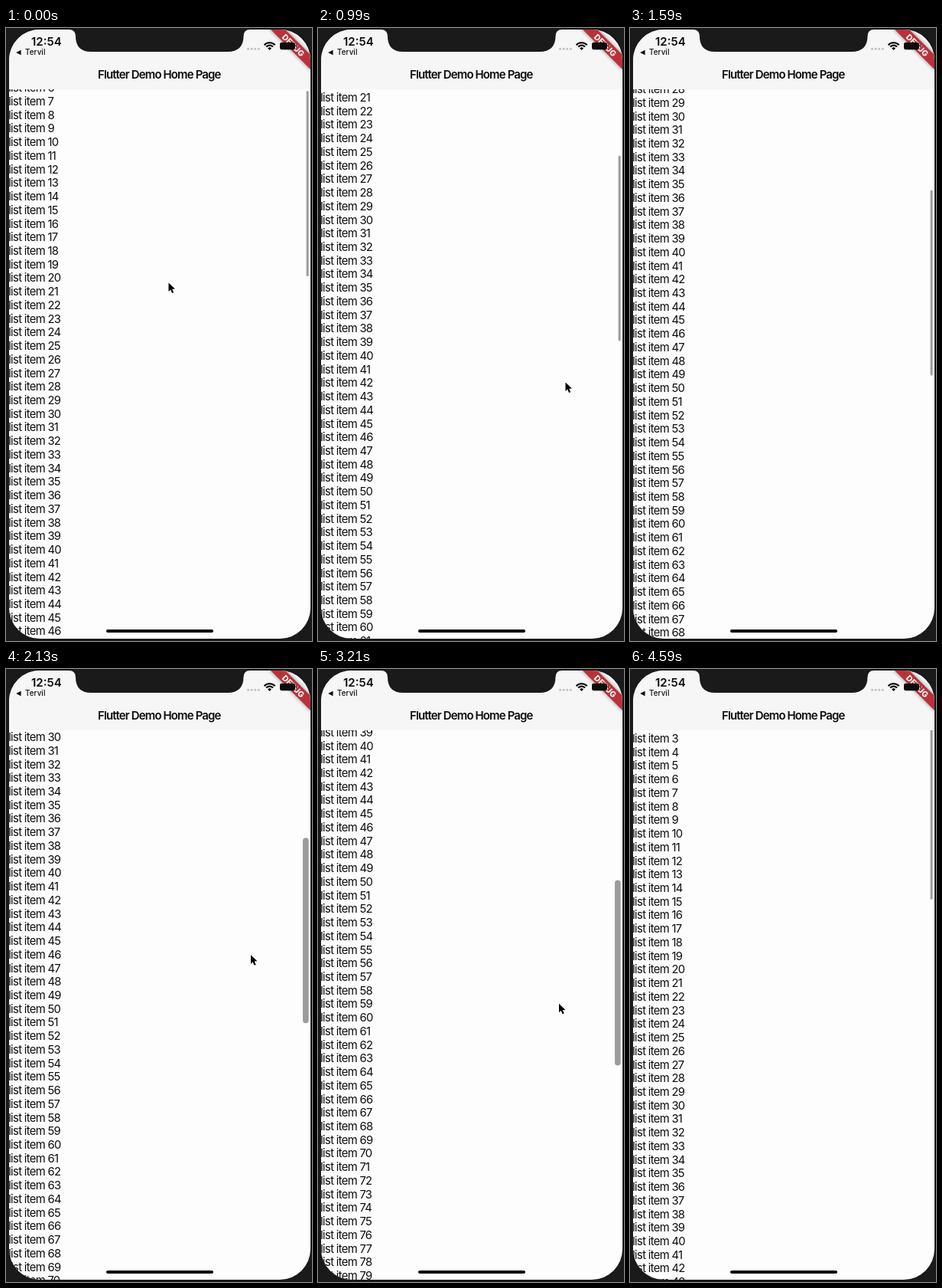
Write an HTML page with a canvas that moves like this. It is 400 by 800 pixels and loops after 5040 ms.

```html
<!DOCTYPE html>
<html lang="en">
<head>
<meta charset="utf-8">
<style>
html, body { margin: 0; width: 100%; height: 100%; overflow: hidden; background: #1a1a1a; }
canvas { display: block; width: 400px; height: 800px; }
</style>
</head>
<body>
<canvas id="stage" width="400" height="800"></canvas>
<script>
const ctx = document.getElementById('stage').getContext('2d');
const LOOP = 5040, STEP = 30, LAST = 4590;
const ROW = 17.73, FONT = 'Inter, "Open Sans", sans-serif';
const BEZEL = '#1a1a1a', PAPER = '#fdfdfe', BAR = '#f6f6f6', INK = '#0c0c0c';

const linear = u => u;
const smooth = u => u * u * (3 - 2 * u);
const easeIn = u => u * u;
const easeOut = u => 1 - (1 - u) * (1 - u);
const clamp = (v, lo, hi) => Math.min(hi, Math.max(lo, v));

// Keys are [time, ...values, easing into this key].
function track(keys, t) {
  const i = keys.findIndex(k => k[0] > t);
  if (i === 0) return keys[0].slice(1, -1);
  if (i < 0) return keys[keys.length - 1].slice(1, -1);
  const a = keys[i - 1], b = keys[i];
  const u = b[b.length - 1]((t - a[0]) / (b[0] - a[0]));
  return a.slice(1, -1).map((v, n) => v + (b[n + 1] - v) * u);
}

// Scroll position, as the item number on the first full row.
const FLING = 690, GRAB = 1900;
const fling = t => 31.9 - 10.9 * Math.exp((990 - t) / 500);
const scrollKeys = [
  [0, 6.72, linear],
  [300, 6.72, linear],
  [FLING, fling(FLING), easeIn]
];
const dragKeys = [
  [GRAB, fling(GRAB), linear],
  [2190, 30.1, linear],
  [2715, 15.7, smooth],
  [2760, 16.05, easeIn],
  [3210, 39.46, smooth],
  [3390, 42, easeOut],
  [3900, 20, smooth],
  [4140, 20, linear],
  [LAST, 3, smooth]
];
function scrollAt(t) {
  if (t < FLING) return track(scrollKeys, t)[0];
  return t < GRAB ? fling(t) : track(dragKeys, t)[0];
}

const thumbTop = p => Math.max(79, 82 + (p - 6.72) * 5.91);

const pointerKeys = [
  [0, 212.5, 332.5, linear],
  [300, 212.5, 332.5, linear],
  [FLING, 216, 240, smooth],
  [990, 323.5, 462.5, smooth],
  [1350, 410, 470, smooth],
  [1590, 410, 400, smooth],
  [GRAB, 320, 373, smooth]
];
const dragX = [
  [GRAB, 320, linear],
  [2190, 320, linear],
  [2760, 313.5, smooth],
  [3210, 315, smooth],
  [3960, 318, smooth]
];
const leaveKeys = [
  [3960, 318, 312, linear],
  [4260, 412, 360, smooth]
];
function pointerAt(t, p) {
  if (t < GRAB) return track(pointerKeys, t);
  if (t >= 3960) return track(leaveKeys, t);
  return [track(dragX, t)[0], 373 + (thumbTop(p) - 220) * 1.15];
}

function text(str, x, y, size, weight, spacing, color = INK, align = 'left') {
  ctx.font = `${weight} ${size}px ${FONT}`;
  ctx.letterSpacing = spacing + 'px';
  ctx.textAlign = align;
  ctx.fillStyle = color;
  ctx.fillText(str, x, y);
}

function pill(x, y, w, h, r, color) {
  ctx.fillStyle = color;
  ctx.beginPath();
  ctx.roundRect(x, y, w, h, r);
  ctx.fill();
}

function polygon(points, color) {
  ctx.fillStyle = color;
  ctx.beginPath();
  points.forEach(([x, y]) => ctx.lineTo(x, y));
  ctx.closePath();
  ctx.fill();
}

function drawList(p) {
  ctx.save();
  ctx.beginPath();
  ctx.rect(4, 80, 394, 718);
  ctx.clip();
  const first = Math.max(0, Math.floor(p) - 2);
  for (let n = first; n < first + 46; n++)
    text('list item ' + n, 3.2, 96 + (n - p) * ROW, 14.8, 400, -0.68);
  ctx.restore();
}

function drawThumb(t, p) {
  const grow = clamp((t - 1960) / 100, 0, 1) * clamp((4060 - t) / 100, 0, 1);
  const w = 3 + 4.6 * grow;
  const h = 242 - Math.max(0, 6.25 - p) * 6.2;
  pill(395.6 - w, thumbTop(p), w, h, w / 2, '#9c9c9e');
}

function drawBanner() {
  ctx.save();
  ctx.shadowColor = 'rgba(0, 0, 0, 0.45)';
  ctx.shadowBlur = 5;
  polygon([[344, 0], [363, 0], [400, 37], [400, 56]], '#b8323a');
  ctx.restore();
  ctx.save();
  ctx.translate(375.5, 22.5);
  ctx.rotate(Math.PI / 4);
  text('DEBUG', 0, 3.8, 10.5, 800, -0.1, '#fbf3f3', 'center');
  ctx.restore();
}

function drawStatus() {
  text('12:54', 33, 22.6, 15, 600, 0);
  polygon([[13.2, 32], [19.6, 28.7], [19.6, 35.3]], INK);
  text('Tervil', 25, 35.4, 9.8, 500, 0.1);
  for (let i = 0; i < 4; i++) pill(315 + i * 4.6, 25.8, 3, 3, 1.5, '#c2c2c4');

  ctx.strokeStyle = INK;
  ctx.lineWidth = 2.2;
  for (const r of [9.4, 5.9]) {
    ctx.beginPath();
    ctx.arc(344.6, 28.5, r, -Math.PI * 0.77, -Math.PI * 0.23);
    ctx.stroke();
  }
  polygon([[344.6, 29], [342, 26.2], [344.6, 25], [347.2, 26.2]], INK);

  pill(358, 18.8, 20, 9.4, 2.6, INK);
  pill(379, 21.8, 1.5, 3.6, 0.7, '#50282a');
}

function drawNotch() {
  ctx.fillStyle = BEZEL;
  ctx.beginPath();
  ctx.moveTo(82, 0);
  ctx.lineTo(82, 2);
  ctx.quadraticCurveTo(91, 2, 91, 11);
  ctx.bezierCurveTo(91, 24, 98, 31, 111, 31);
  ctx.lineTo(290, 31);
  ctx.bezierCurveTo(303, 31, 310.5, 24, 310.5, 11);
  ctx.quadraticCurveTo(310.5, 2, 319, 2);
  ctx.lineTo(319, 0);
  ctx.fill();
}

function drawPointer([x, y]) {
  ctx.save();
  ctx.translate(x, y);
  ctx.scale(0.88, 0.88);
  ctx.beginPath();
  [[0, 0], [0, 13], [3, 10.2], [5.2, 15.4], [7.6, 14.4], [5.4, 9.4], [9.6, 9.2]]
    .forEach(([px, py]) => ctx.lineTo(px, py));
  ctx.closePath();
  ctx.strokeStyle = '#fff';
  ctx.lineWidth = 1.8;
  ctx.lineJoin = 'round';
  ctx.stroke();
  ctx.fillStyle = '#000';
  ctx.fill();
  ctx.restore();
}

function draw(t) {
  const p = scrollAt(t);
  ctx.fillStyle = BEZEL;
  ctx.fillRect(0, 0, 400, 800);
  ctx.save();
  ctx.beginPath();
  ctx.roundRect(4, 2, 394, 795, 40);
  ctx.clip();
  ctx.fillStyle = PAPER;
  ctx.fillRect(0, 0, 400, 800);
  drawList(p);
  drawThumb(t, p);
  ctx.fillStyle = BAR;
  ctx.fillRect(0, 0, 400, 80);
  text('Flutter Demo Home Page', 120, 66, 15, 600, -0.88);
  drawBanner();
  drawStatus();
  drawNotch();
  pill(131, 785, 140, 4, 2, '#000');
  drawPointer(pointerAt(t, p));
  ctx.restore();
}

const start = performance.now();
function tick() {
  const t = (performance.now() - start) % LOOP;
  draw(Math.min(LAST, Math.floor(t / STEP) * STEP));
  requestAnimationFrame(tick);
}
tick();
</script>
</body>
</html>
```
